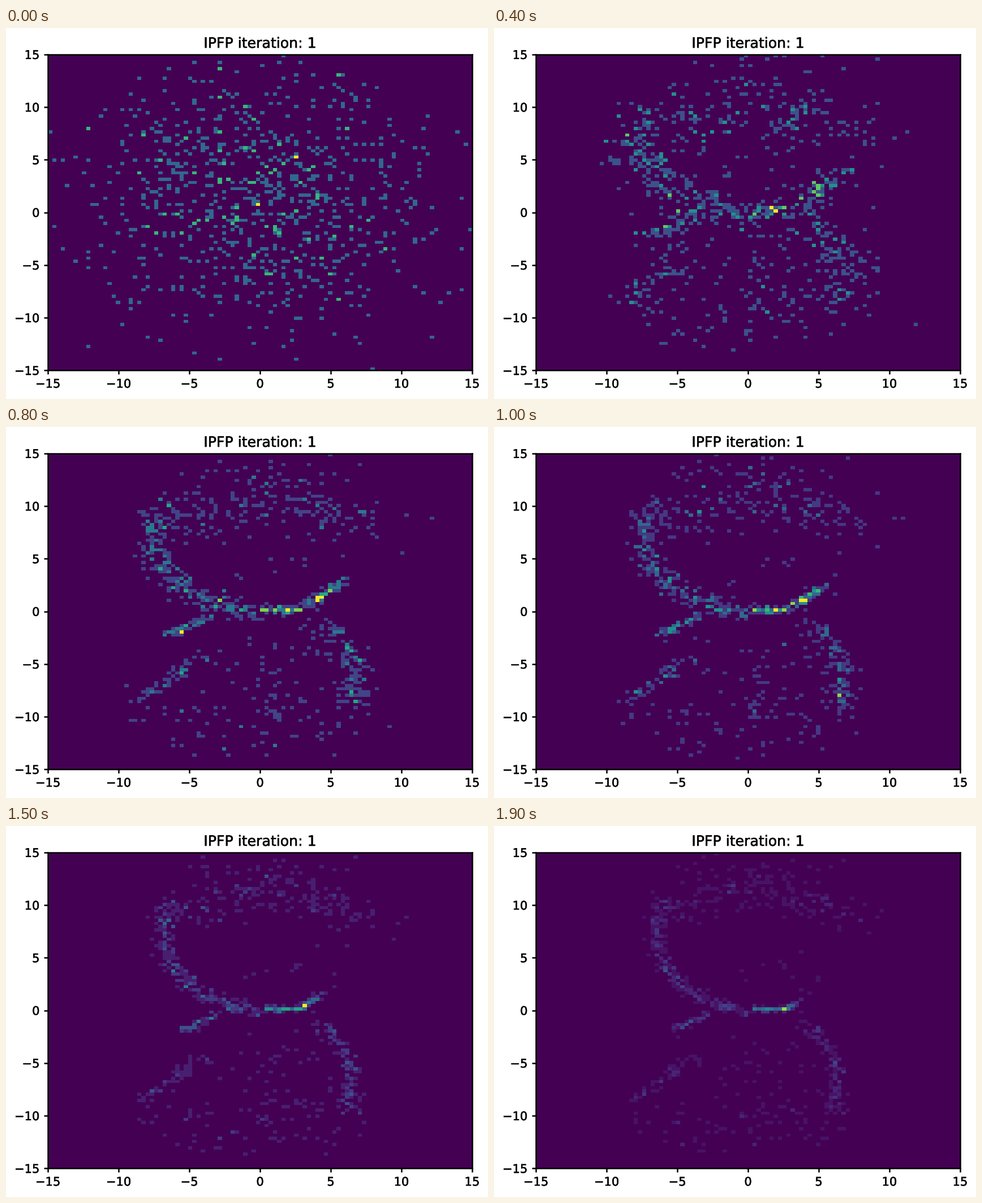
Recreate the animation shown at these times as a matplotlib script. Size 852 px wide and 657 px high, loop 2 s.

```python
import numpy as np
import matplotlib.pyplot as plt
from matplotlib.animation import FuncAnimation
from matplotlib.patheffects import withStroke

W, H, DPI = 852, 657, 100
FRAMES, STEP = 20, 100
BINS, LIM = 100, 15
K = 1.512  # scale of the default text and line sizes

plt.rcParams.update({
    "font.family": "DejaVu Sans",
    "font.size": 10 * K,
    "axes.titlesize": 12 * K,
    "axes.titlepad": 5.6 * K,
    "axes.linewidth": 1.2 * K,
    "xtick.major.size": 3.5 * K, "ytick.major.size": 3.5 * K,
    "xtick.major.width": 1.2 * K, "ytick.major.width": 1.2 * K,
    "xtick.major.pad": 3.5 * K, "ytick.major.pad": 3.5 * K,
})

rng = np.random.default_rng(5)


def line(x0, y0, x1, y1):
    return lambda u: (x0 + (x1 - x0) * u, y0 + (y1 - y0) * u)


def arc(side, a0, a1):
    """Part of one half of the S: side -1 is upper left, 1 is lower right."""
    def at(u):
        a = a0 + (a1 - a0) * u
        return side * (0.3 + 6.1 * np.sin(a)), 0.2 - side * 7.2 * (1 - np.cos(a))
    return at


def cap(u):
    x = -5.8 + 13.4 * u
    return x, 11.5 - 0.055 * x ** 2


class Strand:
    """Particles that leave a wide cloud and settle along a guide curve."""

    def __init__(self, n, guide, spread, grow=(0, 0), tau=3.0, widen=1.0,
                 lift=0, lump=0):
        u = rng.uniform(0, 1, n)
        u[:lump] = rng.normal(0.7, 0.012, lump)
        self.x, self.y = guide(u)
        self.spread, self.grow = spread, grow
        self.widen, self.lift = widen, lift
        self.off = rng.normal(0, 0.95, (2, n))
        self.shake = rng.normal(0, 0.25, (FRAMES, 2, n))
        self.tau = tau * rng.uniform(0.7, 1.35, n)
        reach = rng.uniform(2, 6.2, n)
        gx, gy = self.settled(1)
        self.cloud = (np.array([0.8 * gx, 0.7 * gy + 0.4])
                      + reach * rng.normal(0, 1, (2, n)))

    def settled(self, r):
        ax, ay = self.grow
        x = 0.5 + (self.x - 0.5) * (1 + ax * r)
        y = self.y * (1 + ay * r) + self.lift * np.maximum(x - 2.8, 0)
        return np.array([x, y])

    def at(self, i):
        r = (1 - i / (FRAMES - 1)) ** 1.2
        noise = self.spread * (1 + self.widen * r) * (self.off + self.shake[i])
        w = np.exp(-i / self.tau)
        return w * self.cloud + (1 - w) * (self.settled(r) + noise)


strands = [
    Strand(195, arc(-1, 0.15, 2.0), 0.32, (.3, -.05), 2.6, 1.6),
    Strand(115, line(0.3, 0.12, 3.5, 0.14), 0.11, (1.5, 0), 1.9, 1.2, lift=.85, lump=17),
    Strand(45, line(-5.1, -1.7, -2.9, -0.4), 0.2, (.45, .6), 2.0, 0.6),
    Strand(25, line(-2.2, 0.6, 0.4, -0.2), 0.25, (.3, 0), 2.2, 1.8),
    Strand(110, arc(1, 0.65, 1.95), 0.33, (.2, -.05), 3.0, 1.5),
    Strand(45, line(-4.2, -4.6, -8.2, -8.6), 0.35, (.12, 0), 2.2, 0.4),
    Strand(80, line(-7.5, -10.8, 6, -10.4), 1.3, (.08, -.05), 3.4, 0.6),
    Strand(35, line(-3, -4, 2.5, -6), 2.0, (0, 0), 3.4, 0.5),
    Strand(175, cap, 1.05, (.08, -.14), 3.2, 1.2),
    Strand(20, line(-6, 13.8, 7, 13.8), 0.9, (.1, 0), 3.4, 0.6),
    Strand(12, line(0.5, 4.5, 5.5, 2.5), 0.9, (.2, .1), 3.2, 1.5),
]

edges = np.linspace(-LIM, LIM, BINS + 1)


def counts(i):
    x, y = np.hstack([s.at(i) for s in strands])
    return np.histogram2d(y, x, bins=(edges, edges))[0]


def peak(i):
    return np.ceil(3 + 17 * (i / (FRAMES - 1)) ** 3)


fig = plt.figure(figsize=(W / DPI, H / DPI), dpi=DPI, facecolor="white")
ax = fig.add_axes([74.2 / W, 1 - 606.2 / H, 749.8 / W, 559.4 / H])
mesh = ax.pcolormesh(edges, edges, counts(0), cmap="viridis", vmin=0, vmax=3)
ticks = range(-LIM, LIM + 1, 5)
ax.set(xlim=(-LIM, LIM), ylim=(-LIM, LIM), xticks=ticks, yticks=ticks)
ax.set_title("IPFP iteration: 1")
for text in [ax.title, *ax.get_xticklabels(), *ax.get_yticklabels()]:
    text.set_path_effects([withStroke(linewidth=0.4, foreground="black")])


def update(i):
    mesh.set_array(counts(i))
    mesh.set_clim(0, peak(i))
    return (mesh,)


anim = FuncAnimation(fig, update, frames=FRAMES, interval=STEP,
                     init_func=lambda: update(0), repeat=True, repeat_delay=0)
plt.show()
```
